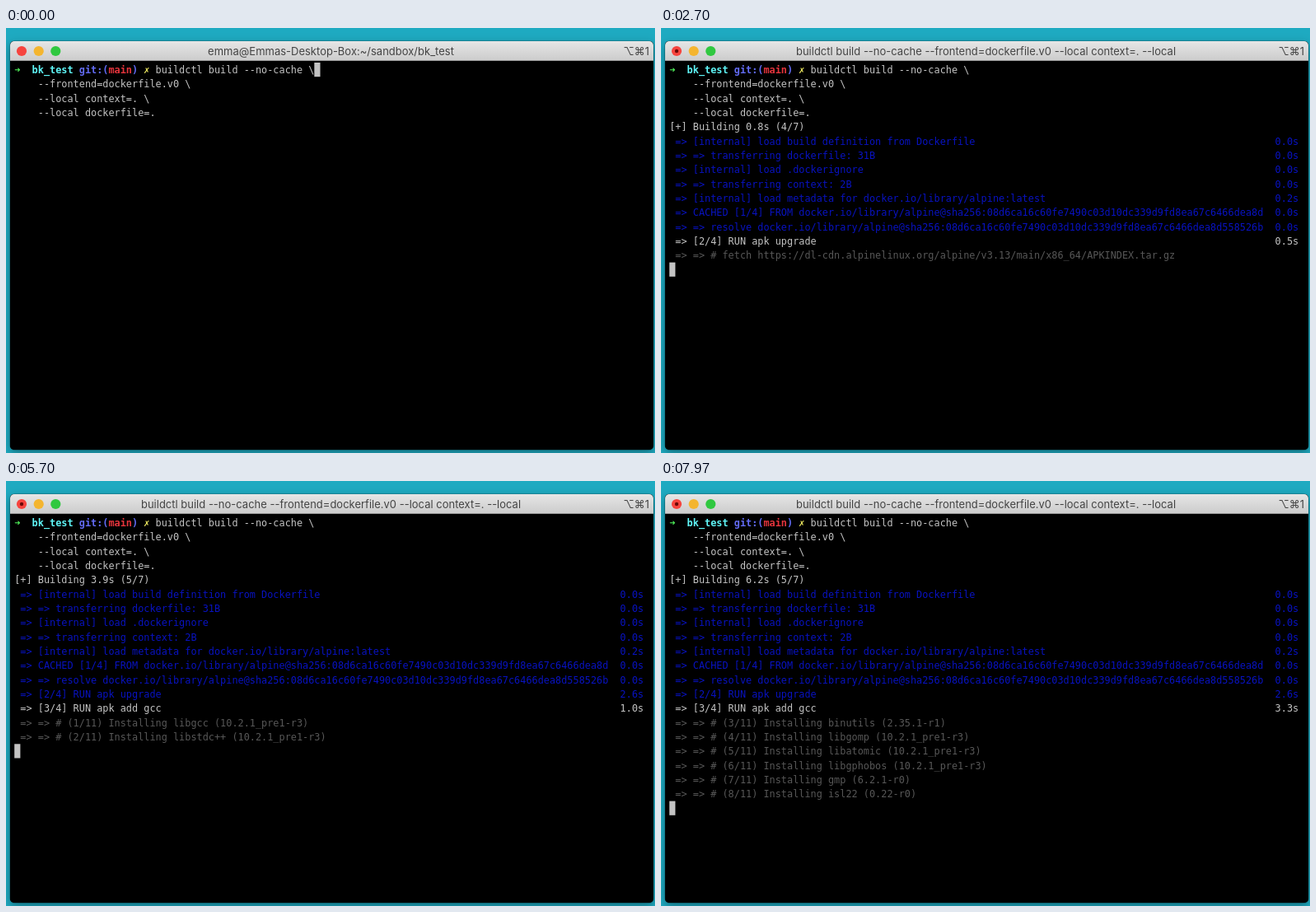
An HTML page with a canvas that plays this animation: 788x516 px, repeating every 8 s.

```html
<!DOCTYPE html>
<html lang="en">
<head>
<meta charset="utf-8">
<title>Terminal build</title>
<style>
  html, body { margin: 0; width: 100%; height: 100%; overflow: hidden; background: #1eaac1; }
  canvas { display: block; }
</style>
</head>
<body>
<canvas id="stage" width="788" height="516"></canvas>
<script>
const ctx = document.getElementById('stage').getContext('2d');
const LOOP = 8000, ENTER = 1650;
const CELL = 7.14, ROW = 17.33, LEFT = 10.2, TOP = 42;
const COLUMNS = 107;
const MONO = '11.86px "DejaVu Sans Mono", monospace';
const WHITE = '#c3c3c3', BLUE = '#0812c0', GRAY = '#575757';
const IMAGE = 'docker.io/library/alpine';
const DIGEST = '08d6ca16c60fe7490c03d10dc339d9fd8ea67c6466dea8d';
const MIRROR = 'https://dl-cdn.alpinelinux.org/alpine/v3.13/';

const PROMPT = [
  ['➜', 0, '#4ff05a'], ['bk_test', 3, '#5ff5f7'], ['git:(', 11, '#626bf5'],
  ['main', 16, '#e6343c'], [')', 20, '#626bf5'], ['✗', 22, '#f3ee62']
];
const COMMAND = [
  '--frontend=dockerfile.v0 \\', '--local context=. \\', '--local dockerfile=.'
];

// Log lines with the build second at which each one appears.
const FETCHES = [[0.5, 'main'], [1.6, 'community']];
const PACKAGES = [
  [3.4, 'libgcc (10.2.1_pre1-r3)'], [3.7, 'libstdc++ (10.2.1_pre1-r3)'],
  [4.2, 'binutils (2.35.1-r1)'], [5.3, 'libgomp (10.2.1_pre1-r3)'],
  [5.5, 'libatomic (10.2.1_pre1-r3)'], [5.7, 'libgphobos (10.2.1_pre1-r3)'],
  [6.0, 'gmp (6.2.1-r0)'], [6.1, 'isl22 (0.22-r0)']
];

// Characters sit on the terminal grid.
function write(text, col, row, color, weight = '') {
  ctx.font = weight + MONO;
  ctx.fillStyle = color;
  ctx.textAlign = 'left';
  [...text].forEach((ch, i) => {
    if (ch !== ' ') ctx.fillText(ch, LEFT + (col + i) * CELL, TOP + 13 + row * ROW);
  });
}

function cursor(col, row) {
  ctx.fillStyle = WHITE;
  ctx.fillRect(LEFT + col * CELL, TOP + row * ROW, 7.2, 17.2);
}

function dot(x, y, r, color) {
  ctx.fillStyle = color;
  ctx.beginPath();
  ctx.arc(x, y, r, 0, Math.PI * 2);
  ctx.fill();
}

function panel(x, y, w, h, radii, fill) {
  ctx.fillStyle = fill;
  ctx.beginPath();
  ctx.roundRect(x, y, w, h, radii);
  ctx.fill();
}

function drawWindow(running) {
  ctx.fillStyle = '#1eaac1';
  ctx.fillRect(0, 0, 788, 516);

  ctx.save();
  ctx.shadowColor = 'rgba(0,0,0,.35)';
  ctx.shadowBlur = 12;
  ctx.shadowOffsetY = 4;
  panel(5, 16, 781, 496, 5, '#000');
  ctx.restore();
  panel(4.5, 15.5, 782, 497, 5.5, 'rgba(0,0,0,.35)');
  panel(5, 16, 781, 496, 5, '#000');

  const bar = ctx.createLinearGradient(0, 16, 0, 40);
  bar.addColorStop(0, '#e6e6e6');
  bar.addColorStop(1, '#cbcbcb');
  panel(5, 16, 781, 23.7, [5, 5, 0, 0], bar);

  dot(19, 28, 6.1, '#f6443e');
  dot(39.7, 28, 6.1, '#f4b52f');
  dot(60.3, 28, 6.1, '#30c840');
  if (running) dot(19, 28, 2.2, '#6b0a08');

  ctx.font = '13px Inter, "DejaVu Sans", sans-serif';
  ctx.fillStyle = '#444';
  ctx.textAlign = 'center';
  ctx.fillText(running
    ? 'buildctl build --no-cache --frontend=dockerfile.v0 --local context=. --local'
    : 'emma@Emmas-Desktop-Box:~/sandbox/bk_test', 394.5, 32.5);
  ctx.textAlign = 'right';
  ctx.fillText('⌥⌘1', 781, 32.5);
}

function drawCommand() {
  PROMPT.forEach(([text, col, color]) => write(text, col, 0, color, 'bold '));
  write('buildctl build --no-cache \\', 24, 0, WHITE);
  COMMAND.forEach((line, i) => write(line, 4, i + 1, WHITE));
}

// Returns the visible build lines as [text, time, color].
function buildLines(now) {
  const lines = [];
  const add = (text, seconds = 0, color = BLUE) =>
    lines.push([' => ' + text, seconds.toFixed(1) + 's', color]);
  const step = (text, start, length) => {
    const done = now >= start + length - 0.01;
    add(text, done ? length : Math.max(0, now - start), done ? BLUE : WHITE);
    return done;
  };
  const log = text => lines.push([' => => # ' + text, '', GRAY]);
  const shown = ([at]) => now >= at - 0.01;
  let progress = '2/3';

  add('[internal] load build definition from Dockerfile');
  add('=> transferring dockerfile: 31B');
  add('[internal] load .dockerignore');
  add('=> transferring context: 2B');
  if (step(`[internal] load metadata for ${IMAGE}:latest`, 0.1, 0.2)) progress = '3/3';

  if (now >= 0.39) {
    progress = '4/7';
    add(`CACHED [1/4] FROM ${IMAGE}@sha256:${DIGEST}`);
    add(`=> resolve ${IMAGE}@sha256:${DIGEST}558526b`);
    if (step('[2/4] RUN apk upgrade', 0.3, 2.6)) {
      progress = '5/7';
      step('[3/4] RUN apk add gcc', 2.9, 99);
      PACKAGES.map(([at, name], i) => [at, `(${i + 1}/11) Installing ${name}`])
        .filter(shown).slice(-6).forEach(([, text]) => log(text));
    } else {
      FETCHES.filter(shown).forEach(([, repo]) =>
        log(`fetch ${MIRROR}${repo}/x86_64/APKINDEX.tar.gz`));
    }
  }
  return [[`[+] Building ${now.toFixed(1)}s (${progress})`, '', WHITE], ...lines];
}

function draw(t) {
  const running = t >= ENTER;
  const now = Math.floor((t - 1825) * 1.012 / 100) / 10;
  drawWindow(running);
  drawCommand();
  if (!running) return cursor(51, 0);

  const lines = now >= 0.1 ? buildLines(now) : [];
  lines.forEach(([text, time, color], i) => {
    write(text, 0, i + 4, color);
    write(time, COLUMNS - time.length, i + 4, color);
  });
  cursor(0, 4 + lines.length);
}

const begin = performance.now();
function tick() {
  draw((performance.now() - begin) % LOOP);
  requestAnimationFrame(tick);
}
tick();
</script>
</body>
</html>
```
